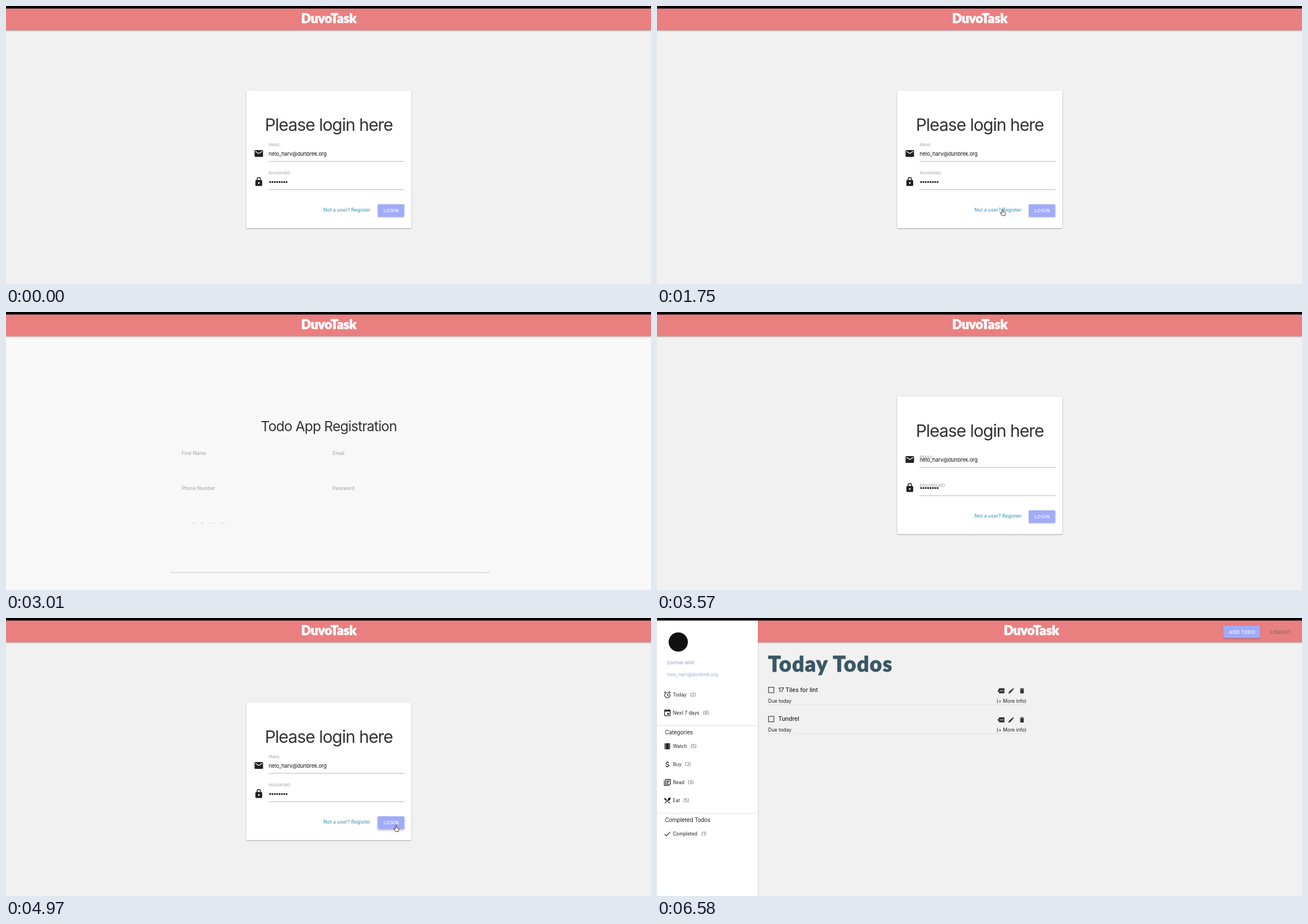
Write an HTML page that moves like this. It is 1138x492 px and loops after 6.65 s.

```html
<!DOCTYPE html>
<html lang="en">
<head>
<meta charset="utf-8">
<title>Todo app demo</title>
<style>
  html, body { margin: 0; width: 100%; height: 100%; overflow: hidden; background: #f1f1f1; }
  svg { display: block; width: 100%; height: 100%; font: 8.4px Inter, sans-serif; fill: #222; }
  .brand, .headline { font-family: Lato, sans-serif; font-weight: 900; stroke-width: .8; stroke-linejoin: round; }
  .brand { font-size: 22.5px; fill: #fff; stroke: #fff; }
  .headline { font-size: 37px; fill: #3a5864; stroke: #3a5864; }
  .wide { letter-spacing: 1.4px; }
  .welcome { font-size: 30px; letter-spacing: -1.05px; fill: #333; }
  .signup { font-size: 24.5px; letter-spacing: -.8px; fill: #333; }
  .mid { text-anchor: middle; }
  .field { font-size: 9.2px; letter-spacing: -.1px; fill: #111; }
  .label { fill: #9e9e9e; }
  .link { font-size: 8.6px; font-weight: 500; fill: #4a9fc0; }
  .action { font-size: 8.2px; font-weight: 500; letter-spacing: .4px; }
  .white { fill: #fff; }
  .dim { fill: #666; }
  .user { font-size: 8.2px; font-weight: 500; fill: #9fa8da; }
  .mail { font-size: 7.9px; fill: #9fa8da; }
  .group { font-size: 9.9px; letter-spacing: -.15px; }
  .task { font-size: 10.2px; font-weight: 500; }
  .note { font-size: 8.6px; }
  .stroke { fill: none; stroke: #222; stroke-width: 2; }
  .raised { filter: drop-shadow(0 1px 1px rgba(0, 0, 0, .3)); }
  .hover { filter: drop-shadow(0 2px 2px rgba(0, 0, 0, .35)); }
</style>
</head>
<body>
<svg id="stage" viewBox="0 0 1138 492"></svg>
<script>
const LOOP = 6650, STEP = 70;
const BRAND = 'DuvoTask', MAIL = 'nelo_harv@dunbrek.org';

// Icons on a 24 unit grid: [filled path, stroked path]
const ICONS = {
  mail: ['M2 6q0-2 2-2h16q2 0 2 2v12q0 2-2 2H4q-2 0-2-2zM20 6l-8 5-8-5v2l8 5 8-5z', ''],
  lock: ['M4 10q0-2 2-2h12q2 0 2 2v10q0 2-2 2H6q-2 0-2-2zM12 13a2 2 0 1 0 .1 0z', 'M8 9V6a4 4 0 0 1 8 0v3'],
  alarm: ['', 'M12 5a8 8 0 1 0 .1 0M12 8.5v5l4 2.4M7 2.5L2.6 6.3M17 2.5l4.4 3.8'],
  event: ['M12 12h5v5h-5zM3 3h18v5H3z', 'M4 4v16h16V4M7 1v4M17 1v4'],
  film: ['M4 3h2v2h2V3h8v2h2V3h2v18h-2v-2h-2v2H8v-2H6v2H4zM6 7v2h2V7zM6 11v2h2v-2zM6 15v2h2v-2zM16 7v2h2V7zM16 11v2h2v-2zM16 15v2h2v-2z', ''],
  money: ['', 'M16 9q-.4-3-4-3t-4 3 4 3.2 4.200 3.200-4.200 3-4.400-3M12 3v3M12 18v3'],
  books: ['', 'M7 3h14v14H7zM3 6v15h15M10 7h8M10 10h8M10 13h4'],
  menu: ['M4 3.500l7 7-2.800 2.800L4 9.200q-2.300-3 0-5.700zM14 12q-2-3 1-7 4-4 6-1t-1 6-5 2z', 'M4.400 20.600L15 10M12 13l7.600 7.600'],
  check: ['', 'M4 12.700L9 17.600 20.300 6.300'],
  tag: ['M0 12l5.400-8q.6-1 1.600-1h15q2 0 2 2v14q0 2-2 2H7q-1 0-1.600-1zM7.500 10.500v3h3v-3zM12.500 10.500v3h3v-3zM17.500 10.500v3h3v-3z', ''],
  pencil: ['M3 17.250V21h3.750L17.800 9.940l-3.750-3.750zM20.700 7q.8-.7 0-1.400l-2.300-2.300q-.7-.7-1.400 0l-1.900 1.800 3.750 3.750z', ''],
  trash: ['M6 7h12v12q0 2-2 2H8q-2 0-2-2zM5 4h3.500l1-1h5l1 1H19v2H5z', ''],
};

const text = (x, y, s, cls = '') => `<text x="${x}" y="${y}" class="${cls}">${s}</text>`;
const rect = (x, y, w, h, fill, extra = '') =>
  `<rect x="${x}" y="${y}" width="${w}" height="${h}" fill="${fill}" ${extra}/>`;
const icon = (name, cx, cy, size, tone = '#222') => {
  const [fill, line] = ICONS[name], k = size / 24;
  return `<g transform="translate(${cx - size / 2} ${cy - size / 2}) scale(${k})">
    <path d="${fill}" fill="${tone}" fill-rule="evenodd"/><path d="${line}" class="stroke"/></g>`;
};
const button = (x, y, w, h, id) => rect(x, y, w, h, '#a0abfb', `rx="1" class="raised" id="${id}"`);
const header = (x, center) =>
  rect(x, 4, 1138 - x, 39, '#ea7f80', 'class="raised"') + text(center, 29.5, BRAND, 'brand mid');

function loginPage() {
  const dots = Array.from({ length: 8 }, (_, i) =>
    `<circle cx="${466 + i * 4.15}" cy="311.500" r="1.600" fill="#111"/>`).join('');
  return header(0, 569.5) + rect(424, 150, 291, 243, '#fff', 'class="raised"')
    + text(569.5, 221, 'Please login here', 'welcome mid')
    + icon('mail', 446, 261, 18) + icon('lock', 446, 311, 18)
    + '<text class="label floating">EMAIL</text><text class="label floating">PASSWORD</text>'
    + text(463.5, 264.500, MAIL, 'field') + dots
    + rect(463, 274.5, 240, 1, '#b4b4b4') + rect(463, 324.5, 240, 1, '#b4b4b4')
    + text(560, 363.5, 'Not a user? Register', 'link')
    + button(656, 351, 46.5, 22, 'loginButton') + text(666, 364.5, 'LOGIN', 'action white');
}

function registerPage() {
  return rect(0, 0, 1138, 492, '#f8f8f8') + header(0, 569.5)
    + text(569.5, 211, 'Todo App Registration', 'signup mid')
    + text(310, 253, 'First Name', 'label') + text(576, 253, 'Email', 'label')
    + text(310, 315, 'Phone Number', 'label') + text(576, 315, 'Password', 'label')
    + '<path d="M329 373.500h69" stroke="#ccc" stroke-dasharray="4 11 5 9 2 4"/>'
    + rect(290, 460.5, 563, 1, '#c4c4c4');
}

function shell() {
  const items = [
    ['alarm', 'Today', 136], ['event', 'Next 7 days', 168], ['film', 'Watch', 227],
    ['money', 'Buy', 259], ['books', 'Read', 291], ['menu', 'Eat', 323], ['check', 'Completed', 382],
  ];
  return header(178, 660.5) + button(999, 13.5, 65, 22, 'addButton')
    + text(1009, 27.5, 'ADD TODO', 'action white') + text(1082, 28, 'LOGOUT', 'action dim')
    + rect(0, 4, 178, 488, '#fff', 'class="raised"')
    + '<circle cx="37.500" cy="42.500" r="17" fill="#111"/>'
    + text(18, 81.5, 'Dormel Wilti', 'user') + text(18, 103, MAIL, 'mail')
    + rect(0, 190, 178, 1, '#e0e0e0') + rect(0, 345, 178, 1, '#e0e0e0')
    + text(14, 206.3, 'Categories', 'group') + text(14, 361.3, 'Completed Todos', 'group')
    + items.map(([name, label, y]) => icon(name, 18.3, y, 14.500) + text(28, y + 3.2, label)).join('');
}

const homePage = () => text(196, 95, 'Home page for todo list', 'headline') + text(196, 137, 'app', 'headline');

function todayPage() {
  const counts = [[58, 136, 2], [81, 168, 8], [59, 227, 5], [49, 259, 3], [54, 291, 3], [46, 323, 5], [78, 382, 1]];
  const todo = (name, y) => `<g transform="translate(0 ${y})">
    <rect x="196.700" y="-4.700" width="9.500" height="9.500" fill="none" stroke="#444" stroke-width="1.200"/>
    ${text(214, 3.6, name, 'task')}${text(196, 22.7, 'Due today', 'note')}${text(599, 22.7, '(+ More info)', 'note')}
    ${icon('tag', 607, 1.5, 12, '#333')}${icon('pencil', 625, 1.5, 12.500, '#333')}${icon('trash', 644, 1.5, 12.500, '#333')}
    ${rect(196, 25.5, 456, 1, '#e2e2e2')}</g>`;
  return text(196, 95, 'Today Todos', 'headline wide')
    + counts.map(([x, y, n]) => text(x, y + 3.2, `(${n})`, 'dim')).join('')
    + todo('17 Tiles for lint', 127.3) + todo('Tundrel', 178.8);
}

const layers = { login: loginPage(), register: registerPage(), shell: shell(), home: homePage(), today: todayPage() };
stage.innerHTML = rect(0, 0, 1138, 492, '#f1f1f1')
  + Object.entries(layers).map(([id, body]) => `<g id="${id}">${body}</g>`).join('')
  + `<g id="cursor">
      <path id="arrow" d="M0 0V9L2.100 7.100 3.600 10.400 5 9.800 3.600 6.600H6.400Z" fill="#000" stroke="#fff" stroke-width="1" paint-order="stroke"/>
      <path id="hand" d="M-1 .9a1 1 0 0 1 2 0v3.200l3.400.9q1 .4.8 1.600l-.8 4.300h-5.400l-2.800-4.200q-.4-1.400 1.200-.8l1.600 1.200z" fill="#fff" stroke="#222" stroke-width=".9"/>
    </g>`
  + rect(0, 0, 1138, 4.5, '#000');

const $ = id => document.getElementById(id);
const show = (id, on) => $(id).setAttribute('display', on ? 'inline' : 'none');
const floating = [...document.querySelectorAll('.floating')];

// Pointer stops: [time, x, y]
const PATH = [
  [70, 444, 456], [700, 596, 350], [910, 613, 362], [1190, 611, 361], [1400, 609.5, 360],
  [1890, 609.5, 360], [2310, 119, 30], [2450, 118, 30], [2800, 12, 8], [3010, 33, -12],
  [3570, 36, -14], [3990, 517, 341], [4060, 517, 341], [4130, 527, 341], [4270, 527, 341],
  [4900, 688, 367], [5670, 688, 367], [5880, 684, 361], [5950, 684, 361], [6160, 700, 384], [6580, 586, 504],
];

function pointerAt(t) {
  const i = PATH.findIndex(p => p[0] > t);
  if (i < 1) return [-50, -50];
  const [t0, x0, y0] = PATH[i - 1], [t1, x1, y1] = PATH[i];
  const u = (t - t0) / (t1 - t0), e = u * u * (3 - 2 * u);
  return [x0 + (x1 - x0) * e, y0 + (y1 - y0) * e];
}

function draw(time) {
  const t = Math.floor(time % LOOP / STEP) * STEP;
  const page = t < 1820 ? 'login' : t < 3430 ? 'register' : t < 5180 ? 'login' : t < 5530 ? 'home' : 'today';
  const inside = page === 'home' || page === 'today';
  for (const id of ['login', 'register', 'home', 'today']) show(id, id === page);
  show('shell', inside);

  const u = t < 3430 ? 1 : Math.min(1, Math.max(0, (t - 3540) / 200));
  const lift = 1 - (1 - u) ** 2;
  floating.forEach((el, i) => el.setAttribute('transform',
    `translate(463.5 ${264 + 50 * i - 16.2 * lift}) scale(${1 - .2 * lift})`));

  const [x, y] = pointerAt(t);
  const onLink = x > 560 && x < 643 && y > 355 && y < 367;
  const onButton = x > 656 && x < 703 && y > 351 && y < 373;
  const hand = page === 'login' && (onLink || onButton);
  $('cursor').setAttribute('transform', `translate(${x} ${y})`);
  show('arrow', !hand);
  show('hand', hand);
  $('loginButton').setAttribute('class', onButton ? 'hover' : 'raised');
}

const start = performance.now();
function tick() {
  draw(performance.now() - start);
  requestAnimationFrame(tick);
}
tick();
</script>
</body>
</html>
```
